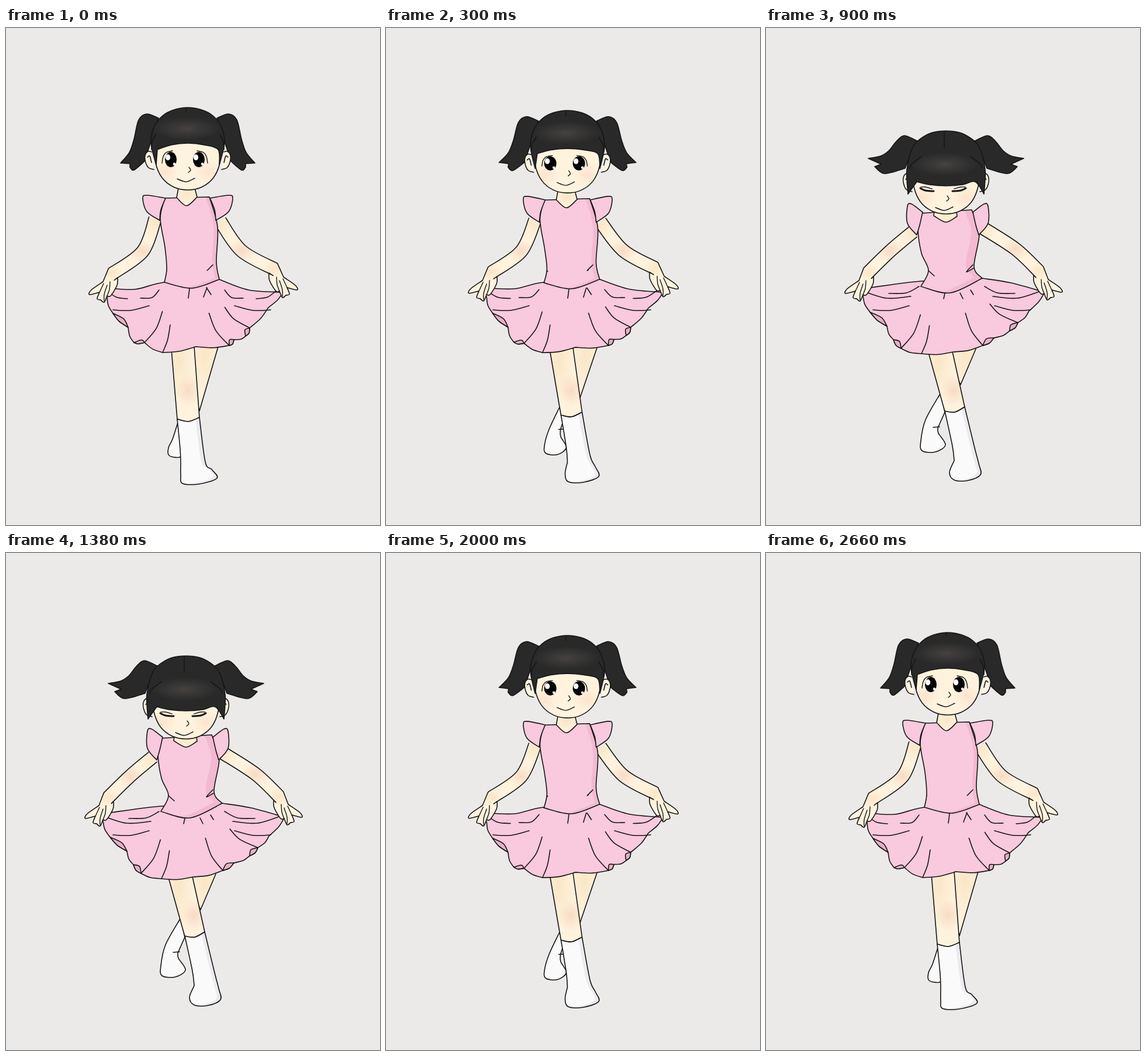
These frames come from a looping animation (640 px wide and 850 px high, 2.9 s). An HTML page with a canvas:

```html
<!DOCTYPE html>
<html lang="en">
<head>
<meta charset="utf-8">
<title>Curtsy</title>
<style>
html, body { margin: 0; width: 100%; height: 100%; overflow: hidden; background: #ebeae8; }
canvas { display: block; }
</style>
</head>
<body>
<canvas id="stage" width="640" height="850"></canvas>
<script>
const ctx = document.getElementById('stage').getContext('2d');
const INK = '#161515', SKIN = '#fff3de', TAN = '#fae6c6', BLUSH = '#f8dac4', PINK = '#f9c9dd',
  ROSE = '#f2b9d0', FLAP = '#e8afc6', HAIR = '#292929', GLOSS = '#454240', SOCK = '#fafafa', GREY = '#ebebef';

// Key points are "x,y,dx,dy": the place when upright and the travel to the full bow.
// "/" makes a corner, ";" starts a new line. Parts that come in pairs are written for the left.
const PIGTAIL = '-50,154,2,40 -70,147,-1,37 -84,157,-1,37 -92,190,-6,20 -100,213,-12,6 -115,231,-18,-8 / -99,232,-12,1 / -99,238,-23,-1 / -92,243,-13,6 -74,228,4,12 / -60,185,0,30 -50,154,2,40';
const EAR = '-62,212 -68,211 -73,218 -72,230 -67,239 -58,242;-69,221 -65,219 -62,230';
const FACE = '-57,190,0,50 -55,230,0,41 -44,256,0,41 -24,272,0,41 0,277,0,41';
const CAP = '-54,234,-11,50 -63,196,-4,46 -57,168,0,36 -43,150,0,39 -24,140,0,39 0,136,0,40';
const FRINGE = '52,208,-2,55 28,200,0,68 0,197,0,73';
const PARTING = '-3,137,0,41 -3,142,0,62';
const STRAND = '-55,182,13,38 -61,195,2,38 -62,208,0,32';
const LID = '-15,6,5,-11 -13,-5,4,0 -8,-12,6,7 3,-15,6,13';
const LASH = '-11,-3 -2,1 12,2';
const SMILE = '2,238 5,243 1,247;-18,258 -3,263 12,257';
const NECK = '295,274,-7,40 292,290,-5,31 / 309,304,-1,28 327,289,0,33 / 323,274,3,40';
const TORSO = '272,291,-9,26 264,325,-4,20 272,375,-6,10 275,412,3,3 271,435,-6,7 / 318,445,-3,8 365,430,5,-2 / 360,400,-4,8 362,340,3,10 348,289,4,22 / 272,291,-9,26';
const SLEEVE = '-38,291,-5,24 -70,286,8,15 -77,291,8,14 -70,314,1,20 -48,329,-5,25 / -46,311,-2,26 -38,291,-5,24';
const CREASES = '354,405 345,414,-2,3 345,414,10,-3;275,415,3,0 275,415,13,9';
const HAND = '-16,14 / -36,28 -39,36 -22,32 / -26,43 -20,45 / -14,49 -9,38 / -3,38 8,20 9,7';
const FINGERS = '-15,17 -22,32;-9,20 -14,36 -14,47;-4,14 -5,27 -9,38';
const ARMS = [['255,327,-4,22 234,382,-21,-1 182,420,-7,-2', 1], ['367,331,4,11 403,381,24,-3 459,412,8,4', -1]];
const HEM = '168,444,-10,3 173,460,-7,-2 183,488,-5,-2 209,512,-2,-2 219,538,-1,-5 237,538,-6,10 268,555,-2,2 325,545,-4,9 382,543,-11,0 390,533,0,-3 410,527,7,-9 417,513,14,-9 449,478,1,6 474,452,3,0';
const WAIST = '415,448,5,-12 365,430,5,-2 / 271,435,-6,-2 220,447,-5,-8 168,444,-10,3';
const PLEATS = '314,446,-8,8 312,462,-8,1;344,444,-12,9 338,460,-1,3;343,444,7,4 351,456,4,0';
const SWAGS = '-147,447,-10,1 -130,460,18,2 -110,463,40,-4;-135,482 -105,483 -73,475;-88,462,-20,-8 -68,461,-10,-8 -56,448,0,-6';
const LEG = '283,549,-5,6 293,669,13,-13 / 312,673,11,-16 331,666,9,-18 / 322,545,-4,4';
const BACK_LEG = '300,545 / 331,655,2,-45 / 363,545,-4,4';
const SOCK_FRONT = '293,669,13,-14 298,720,21,-5 299,745,23,-5 / 299,765,15,-5 302,779,20,-6 330,780,15,-6 361,770,6,-6 352,755,12,-10 341,742,16,-24 331,666,9,-18 / 312,673,11,-16 293,669,13,-14';
const SOCK_BACK = '294,675,5,-51 285,703,-12,-33 278,718,-13,-12 279,731,-12,-8 297,734,-7,-9 310,722,-3,-9 303,705,-8,-12 303,690,-9,-6 / 310,655,-4,2 / 294,675,5,-51';
const WRINKLE = '305,690,-19,-7 315,690,-18,-8';

// Curves at amount n of the travel, moved by x, y; flip -1 mirrors them.
function curves(spec, n = 0, x = 0, y = 0, flip = 1) {
  return spec.split(';').map(c => c.split('/').map(part => part.trim().split(' ').map(p => {
    const [px, py, dx = 0, dy = 0] = p.split(',').map(Number);
    return [x + flip * (px + dx * n), y + py + dy * n];
  })));
}

const points = (...args) => curves(...args)[0][0];

// Completes half a symmetric line whose last point lies on the axis x.
function whole(spec, n, x) {
  const half = points(spec, n, x);
  return [...half, ...half.slice(0, -1).reverse().map(([px, py]) => [2 * x - px, py])];
}

function trace(list) {
  const path = new Path2D();
  for (const curve of list) {
    let last;
    for (const part of curve) {
      const pts = last ? [last, ...part] : part;
      if (!last) path.moveTo(...pts[0]);
      for (let i = 1; i < pts.length; i++) {
        const a = pts[i - 1], b = pts[i], before = pts[i - 2] || a, after = pts[i + 1] || b;
        path.bezierCurveTo(a[0] + (b[0] - before[0]) / 6, a[1] + (b[1] - before[1]) / 6,
          b[0] - (after[0] - a[0]) / 6, b[1] - (after[1] - a[1]) / 6, b[0], b[1]);
      }
      last = pts[pts.length - 1];
    }
  }
  return path;
}

function line(list, width = 1.6) {
  ctx.lineWidth = width;
  ctx.stroke(trace(list));
}

function glow(color, x, y, rx, ry) {
  ctx.save();
  ctx.translate(x, y);
  ctx.scale(rx, ry);
  const g = ctx.createRadialGradient(0, 0, 0, 0, 0, 1);
  g.addColorStop(0, color);
  g.addColorStop(1, color + '00');
  ctx.fillStyle = g;
  ctx.fillRect(-1, -1, 2, 2);
  ctx.restore();
}

// Fills a shape, paints its inside with extra(path), then inks the edge.
function shape(list, color, extra) {
  const path = trace(list);
  ctx.fillStyle = color;
  ctx.fill(path);
  if (extra) {
    ctx.save();
    ctx.clip(path);
    extra(path);
    ctx.restore();
  }
  ctx.lineWidth = 1.6;
  ctx.stroke(path);
}

// Leaves a strip of the shape's own colour along its right edge.
const lit = (color, width) => path => {
  ctx.translate(-width, -2);
  ctx.fillStyle = color;
  ctx.fill(path);
};

function oval(color, x, y, rx, ry) {
  ctx.fillStyle = color;
  ctx.beginPath();
  ctx.ellipse(x, y, rx, ry, 0, 0, 7);
  ctx.fill();
}

function drawLegs(step) {
  shape(curves(SOCK_BACK, step), SOCK);
  line(curves(WRINKLE, step));
  shape(curves(BACK_LEG, step), SKIN, () => glow(TAN, 340, 560, 30, 70));
  shape(curves(LEG, step), SKIN, () => {
    glow(TAN, 295, 570, 30, 70);
    glow(BLUSH, 312 + 9 * step, 620, 22, 28);
  });
  shape(curves(SOCK_FRONT, step), GREY, lit(SOCK, 7));
}

function drawSkirt(bow) {
  const hem = points(HEM, bow);
  // The middle of a scallop, pushed away from the waist.
  const bulge = (a, b, push) => {
    const x = (a[0] + b[0]) / 2, y = (a[1] + b[1]) / 2, d = Math.hypot(x - 315, y - 440);
    return [x + (x - 315) * push / d, y + (y - 440) * push / d];
  };
  const scallops = hem.slice(1).map((b, i) => [bulge(hem[i], b, 3), b]);
  shape([[[hem[0]], ...scallops, ...curves(WAIST, bow)[0]]], PINK);
  for (const i of [2, 4, 8, 10]) {
    const a = hem[i], b = hem[i + 1];
    shape([[[a, bulge(a, b, -6), b], [bulge(a, b, 3), a]]], FLAP);
  }
  for (const [i, reach] of [[5, .45], [6, .35], [8, .45], [11, .38]]) {
    const [x, y] = hem[i], dx = (305 - x) * reach, dy = (420 - y) * reach;
    line([[[hem[i], [x + dx * .65, y + dy * .45], [x + dx, y + dy]]]]);
  }
  line(curves(PLEATS, bow));
  for (const flip of [1, -1]) line(curves(SWAGS, bow, 318, 0, flip));
}

function drawArm([spec, flip], bow, lift) {
  const joints = points(spec, bow);
  joints[2][1] -= lift;
  const side = out => joints.map(([x, y], i) => {
    const a = joints[i - 1] || joints[i], b = joints[i + 1] || joints[i];
    const dx = b[0] - a[0], dy = b[1] - a[1], k = out * flip * 11 / Math.hypot(dx, dy);
    return [x - dy * k, y + dx * k];
  });
  const [wx, wy] = joints[2], [ex, ey] = joints[1];
  const hand = curves(HAND, 0, wx, wy, flip)[0];
  shape([[side(1), ...hand, side(-1).reverse()]], SKIN, () => {
    glow(TAN, ...joints[0], 25, 35);
    glow(BLUSH, ex, ey, 24, 20);
    glow(TAN, wx, wy, 20, 16);
  });
  line(curves(FINGERS, 0, wx, wy, flip), 1.4);
}

function drawEyes(x, y, bow) {
  const rx = 10 + 4 * bow, ry = 13 - 7 * bow;
  for (const flip of [1, -1]) {
    const ex = x - flip * (24 + 4 * bow);
    line(curves(LID, bow, ex, y, flip), 1.4);
    if (bow === 1) {
      line(curves(LASH, 0, ex, y, flip), 3);
    } else {
      oval('#050505', ex, y, rx, ry);
      oval('#fff', ex - 5, y - ry * .3, 4.2, ry * .4);
      oval('#fff', ex + 6, y + ry * .6, 2.2, ry * .19);
    }
  }
}

function drawHead(bow) {
  const x = 311 - 3 * bow, sides = [1, -1];
  for (const flip of sides) {
    shape(curves(PIGTAIL, bow, x, 0, flip), HAIR);
    shape(curves(EAR, 0, x, 38 * bow, flip), SKIN);
  }
  shape([[whole(FACE, bow, x)]], SKIN, () =>
    sides.forEach(s => glow('#fde3cd', x - 3 + 37 * s, 246 + 44 * bow, 24, 20)));
  drawEyes(x - 5, 225 + 52 * bow, bow);
  line(curves(SMILE, 0, x, 49 * bow), 1.4);
  const cap = whole(CAP, bow, x);
  shape([[cap, whole(FRINGE, bow, x), [cap[0]]]], HAIR, () => glow(GLOSS, x - 2, 172 + 61 * bow, 58, 20));
  line(curves(PARTING, bow, x), 1.5);
  for (const flip of sides) line(curves(STRAND, bow, x, 0, flip), 1.5);
}

function draw([bow, step, lift]) {
  ctx.fillStyle = '#ebeae8';
  ctx.fillRect(0, 0, 640, 850);
  ctx.strokeStyle = INK;
  ctx.lineCap = ctx.lineJoin = 'round';
  drawLegs(step);
  drawSkirt(bow);
  ARMS.forEach(arm => drawArm(arm, bow, lift));
  shape(curves(TORSO, bow), ROSE, lit(PINK, 7 + 7 * bow));
  for (const flip of [1, -1]) shape(curves(SLEEVE, bow, 311, 0, flip), PINK);
  line(curves(CREASES, bow));
  shape(curves(NECK, bow), SKIN, () => glow(TAN, 309, 285 + 32 * bow, 24, 18));
  drawHead(bow);
}

// Each pose: how far she bows, how far the feet cross, how high the hands lift.
const stand = [0, 0, 0], dip = [.125, .5, 2], bend = [.5, 1, 6], low = [1, 1, 0];
const steps = [[300, stand], [600, dip], [900, bend], [1700, low], [2000, bend], [2300, dip], [2900, stand]];
const start = performance.now();
let shown;

function tick() {
  const t = (performance.now() - start) % 2900;
  const pose = steps.find(([end]) => t < end)[1];
  if (pose !== shown) draw(shown = pose);
  requestAnimationFrame(tick);
}
tick();
</script>
</body>
</html>
```
